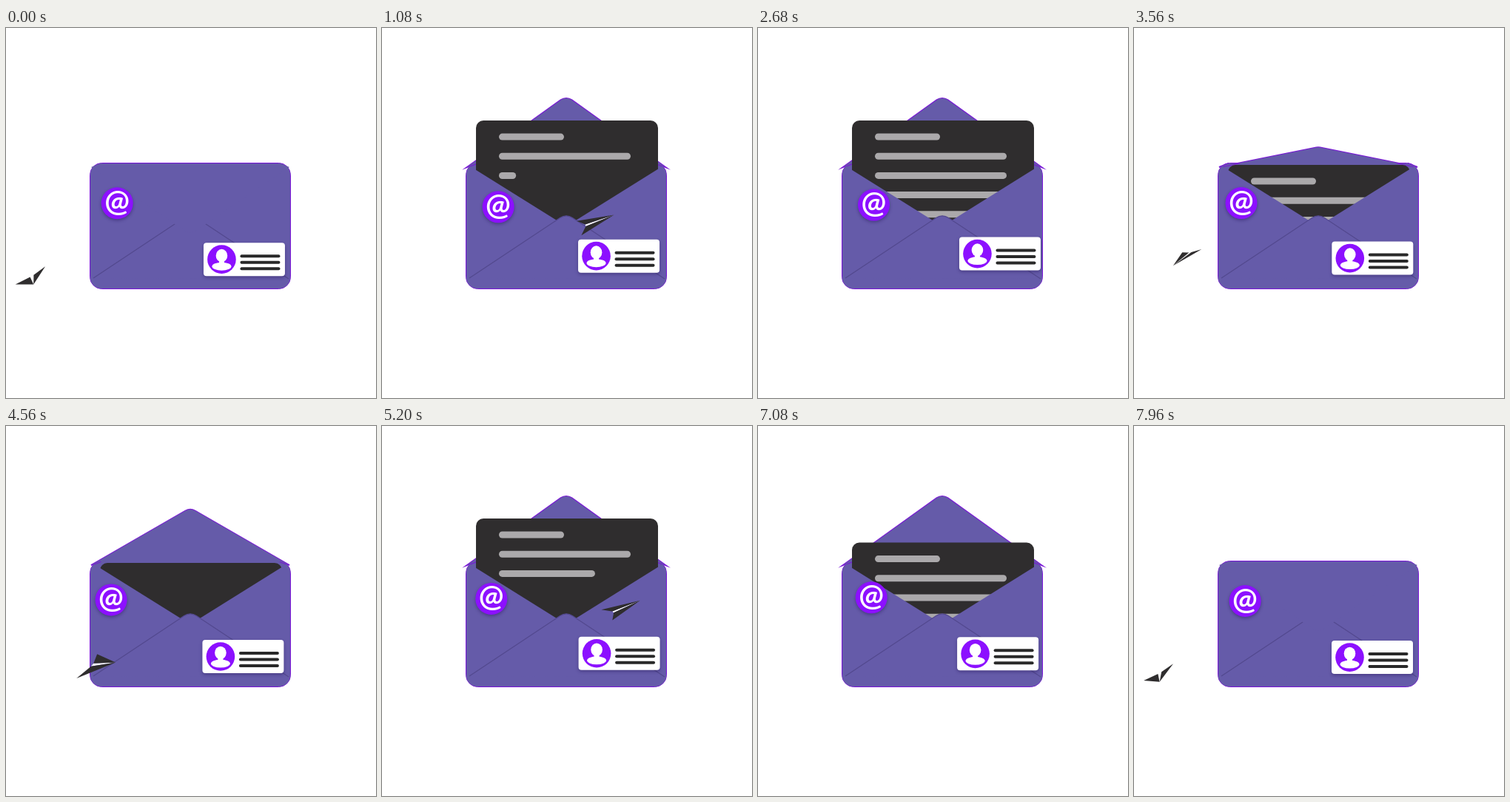
Write an HTML page with a canvas that moves like this. It is 500 by 500 pixels and loops after 8 s.

```html
<!DOCTYPE html>
<html>
<head>
<meta charset="utf-8">
<style>
html, body { margin: 0; width: 100%; height: 100%; overflow: hidden; background: #fff; }
canvas { display: block; }
</style>
</head>
<body>
<canvas id="stage" width="500" height="500"></canvas>
<script>
const ctx = document.getElementById('stage').getContext('2d');
const LOOP = 8000, CYCLE = 4000, TURN = 2 * Math.PI;
const BODY = '#655ba9', EDGE = '#7a14d8', CREASE = '#53498f', VIOLET = '#8c10ff', DARK = '#2f2d2e';

const { sin, cos } = Math;
const clamp = x => Math.min(1, Math.max(0, x));
const ease = (t, start, length) => (1 - cos(Math.PI * clamp((t - start) / length))) / 2;

function fill(color) {
  ctx.fillStyle = color;
  ctx.fill();
}

function stroke(color, width) {
  ctx.strokeStyle = color;
  ctx.lineWidth = width;
  ctx.stroke();
}

function polygon(color, ...points) {
  ctx.beginPath();
  for (const [x, y] of points) ctx.lineTo(x, y);
  ctx.closePath();
  fill(color);
}

function ellipse(x, y, rx, ry, color) {
  ctx.beginPath();
  ctx.ellipse(x, y, rx, ry, 0, 0, TURN);
  fill(color);
}

function box(x, y, w, h, r) {
  ctx.beginPath();
  ctx.roundRect(x, y, w, h, r);
}

function bar(x, y, w, h, color) {
  box(x, y - h / 2, w, h, Math.min(w, h) / 2);
  fill(color);
}

function shadow(on) {
  ctx.shadowColor = on ? 'rgba(30,15,80,.4)' : 'transparent';
  ctx.shadowBlur = on ? 4 : 0;
  ctx.shadowOffsetY = on ? 2 : 0;
}

function flap(open) {
  ctx.beginPath();
  ctx.moveTo(128, 183);
  ctx.lineTo(115, 188);
  ctx.arcTo(249, 188 - 96 * open, 383, 188, 13);
  ctx.lineTo(383, 188);
  ctx.lineTo(370, 183);
  if (open > 0) stroke(EDGE, 2);
  fill(BODY);
}

function letter(t) {
  const top = 185 - 60 * (ease(t, 680, 410) - ease(t, 2870, 400));
  box(127, top, 246, 150, 10);
  fill(DARK);
  for (let i = 0; i < 5; i++) {
    const w = (i ? 178 : 88) * clamp((t - 655 - 200 * i) / 200);
    if (w > 0) bar(158, top + 22 + 26.2 * i, w, 9, '#aba9ab');
  }
}

function pocket() {
  ctx.save();
  box(114, 183, 270, 169, 15);
  ctx.clip();
  polygon(BODY, [113, 183], [249, 268], [385, 183], [385, 353], [113, 353]);
  ctx.beginPath();
  ctx.moveTo(118, 338);
  ctx.arcTo(249, 251, 382, 339, 15);
  ctx.lineTo(382, 339);
  fill(BODY);
  stroke(CREASE, 1.4);
  ctx.restore();
}

function envelope(t) {
  const open = 1.95 * (ease(t, 100, 580) - ease(t, 3320, 580)) - 0.95;
  box(113.5, 182.5, 271, 170, 16);
  fill(BODY);
  stroke(EDGE, 1);
  if (open > 0) flap(open);
  letter(t);
  pocket();
  if (open <= 0) flap(open);
}

function badge(time) {
  const a = TURN * time / LOOP;
  const x = 152 + 5.4 * cos(a - 0.66) - 6.2 * cos(2 * a - 0.16);
  const y = 236.3 + 5 * cos(a - 1.48) + 1.5 * sin(2 * a);
  shadow(true);
  ellipse(x, y, 21.5, 21.5, VIOLET);
  shadow(false);
  ctx.font = '700 40px Lato, "Open Sans", sans-serif';
  const m = ctx.measureText('@');
  ctx.fillStyle = '#fff';
  ctx.fillText('@',
    x + (m.actualBoundingBoxLeft - m.actualBoundingBoxRight) / 2,
    y - 0.5 + (m.actualBoundingBoxAscent - m.actualBoundingBoxDescent) / 2);
}

function card(t) {
  const a = TURN * t / CYCLE;
  ctx.save();
  ctx.translate(
    323.5 + 3.7 * cos(a - 3.85) - 1.5 * cos(2 * a - 9.99),
    308 + 4.7 * cos(a - 0.16));
  shadow(true);
  box(-55, -22.5, 110, 45, 4);
  fill('#fff');
  shadow(false);
  ellipse(-30.5, 0, 19.3, 19.3, VIOLET);
  ellipse(-30.5, -5, 7.8, 8.8, '#fff');
  box(-34, 0, 7, 8, 2);
  fill('#fff');
  ellipse(-30.5, 9.5, 13, 5.5, '#fff');
  for (let i = 0; i < 3; i++) bar(-5.5, -4.5 + 8.5 * i, 54, 4, '#292929');
  ctx.restore();
}

// A paper plane on a tilted orbit; its axes turn with the orbit angle.
function plane(t) {
  const a = TURN * t / CYCLE + 0.05, c = cos(a), s = sin(a);
  const x = 240 - 205 * c, y = 255.5 + 78.5 * c + 25 * s;
  const side = [3 - 23 * c - 4 * s, 11.5 * c + 12 * s];
  const tail = [-2 - 8 * s, 1 - 2 * c + 3 * s];
  const nose = [x + 38 * s, y + 1 + 11 * c - 13 * s];
  const wing = (sign, size) => [
    x + (tail[0] + sign * side[0]) * size,
    y + (tail[1] + sign * side[1]) * size
  ];
  polygon('#fff', nose, wing(1, 0.12), wing(-1, 0.12));
  for (const sign of [1, -1]) polygon(DARK, nose, wing(sign, 1), wing(sign, 0.12));
}

function draw(now) {
  const time = now % LOOP, t = time % CYCLE;
  const behind = t > 2240;
  ctx.fillStyle = '#fff';
  ctx.fillRect(0, 0, 500, 500);
  if (behind) plane(t);
  envelope(t);
  badge(time);
  card(t);
  if (!behind) plane(t);
}

let start;
function tick() {
  const now = performance.now();
  start ??= now;
  draw(now - start);
  requestAnimationFrame(tick);
}
tick();
</script>
</body>
</html>
```
